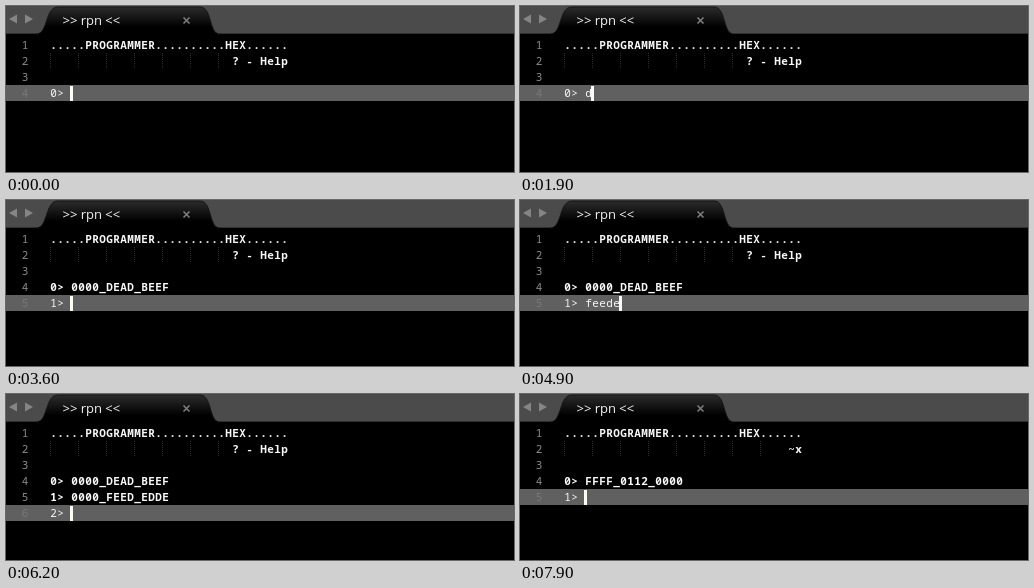
Recreate the animation shown at these times as an HTML page. Size 508 by 166 pixels, loop 8 s.

```html
<!DOCTYPE html>
<html lang="en">
<head>
<meta charset="utf-8">
<title>rpn</title>
<style>
  html, body { margin: 0; width: 100%; height: 100%; overflow: hidden; background: #000; }
  svg { display: block; width: 508px; height: 166px; }
  .code text {
    font: 600 11px "Noto Sans Mono", "DejaVu Sans Mono", monospace;
    letter-spacing: .4px; fill: #f8f8f8; white-space: pre;
  }
  .code .num { font-weight: 500; fill: #8c8c8c; text-anchor: end; }
  .code .active { font-weight: 500; }
  .code .num.active { fill: #787878; }
  .title { font: 500 13px "Open Sans", "Noto Sans", sans-serif; fill: #f4f4f4; }
</style>
</head>
<body>
<svg viewBox="0 0 508 166">
  <defs>
    <linearGradient id="tab" x2="0" y2="1">
      <stop offset="0" stop-color="#2c2c2c"/>
      <stop offset=".75" stop-color="#000"/>
    </linearGradient>
  </defs>
  <rect width="508" height="166"/>
  <rect width="508" height="28" fill="#4b4b4b"/>
  <path d="M0 27.5H508" stroke="#303030"/>
  <path d="M31 28C42 27 39 1 52 1H194C206 1 203 27 213 28Z" fill="url(#tab)" stroke="#161616"/>
  <path d="M33 28H211" stroke="#000" stroke-width="2"/>
  <path d="M11 8.5V17.5L3 13ZM19 8.5V17.5L27 13Z" fill="#858585"/>
  <text class="title" x="56.5" y="18.5">&gt;&gt; rpn &lt;&lt;</text>
  <path d="M177.5 11.5l6 6m0-6l-6 6" stroke="#808080" stroke-width="1.5"/>
  <g class="code">
    <rect id="active" width="508" height="16" fill="#606060"/>
    <path id="guides" stroke="#2c2c2c" stroke-dasharray="1 1" fill="none"/>
    <g id="lines"></g>
    <rect id="caret" width="3" height="15" fill="#fcfcf4"/>
  </g>
</svg>
<script>
const LOOP = 8000, STEP = 100, CHAR = 7, LINE = 16, LEFT = 44, TOP = 31, WIDTH = 34;
const HOLD = 250, BLINK = 1000;
const $ = id => document.getElementById(id);

// Each key: [time, new state]
const keys = [];
let state = { stack: [], input: '', note: '? - Help' };
const put = (time, change) => keys.push([time, state = { ...state, ...change }]);
const type = (word, times) =>
  times.forEach((time, i) => put(time, { input: word.slice(0, i + 1) }));

put(100, {});
type('deadbeef', [1900, 2000, 2100, 2300, 2900, 3100, 3200, 3400]);
put(3600, { stack: ['0000_DEAD_BEEF'], input: '' });
type('feededde', [3900, 4200, 4400, 4600, 4900, 5000, 5300, 5600]);
put(6100, { stack: ['0000_DEAD_BEEF', '0000_FEED_EDDE'], input: '' });
put(6700, { stack: ['0000_FEED_FFFF'], note: 'x | y' });
put(7900, { stack: ['FFFF_0112_0000'], note: '~x' });

function addText(x, row, cls) {
  const el = document.createElementNS('http://www.w3.org/2000/svg', 'text');
  el.setAttribute('x', x);
  el.setAttribute('y', TOP + LINE * row + 12);
  el.setAttribute('class', cls);
  return $('lines').appendChild(el);
}
const rows = Array.from({ length: 6 }, (_, i) => ({
  num: addText(22.7, i, 'num'), text: addText(LEFT + .2, i, 'text')
}));

function show({ stack, input, note }) {
  const prompts = [...stack, input].map((value, i) => `${i}> ${value}`);
  const lines = ['.....PROGRAMMER..........HEX......', note.padStart(WIDTH), '', ...prompts];
  const last = lines.length - 1;
  rows.forEach(({ num, text }, i) => {
    num.textContent = i <= last ? i + 1 : '';
    text.textContent = lines[i] || '';
    for (const el of [num, text]) el.classList.toggle('active', i === last);
  });

  let guides = '';
  for (let col = 0; col < WIDTH - note.length; col += 4)
    guides += `M${LEFT + col * CHAR + .5} ${TOP + LINE}v${LINE}`;
  $('guides').setAttribute('d', guides);

  const y = TOP + LINE * last;
  $('active').setAttribute('y', y);
  $('caret').setAttribute('y', y + 1);
  $('caret').setAttribute('x', LEFT + CHAR * lines[last].length - 1);
}

let shown;
function draw(now) {
  const t = Math.floor(now % LOOP / STEP) * STEP;
  const [time, current] = keys.findLast(key => key[0] <= t) || keys[0];
  if (current !== shown) show(shown = current);
  const idle = Math.max(0, t - time - HOLD);
  $('caret').setAttribute('opacity', (1 + Math.cos(idle / BLINK * 2 * Math.PI)) / 2);
}

const start = performance.now();
function tick() {
  draw(performance.now() - start);
  requestAnimationFrame(tick);
}
tick();
</script>
</body>
</html>
```
